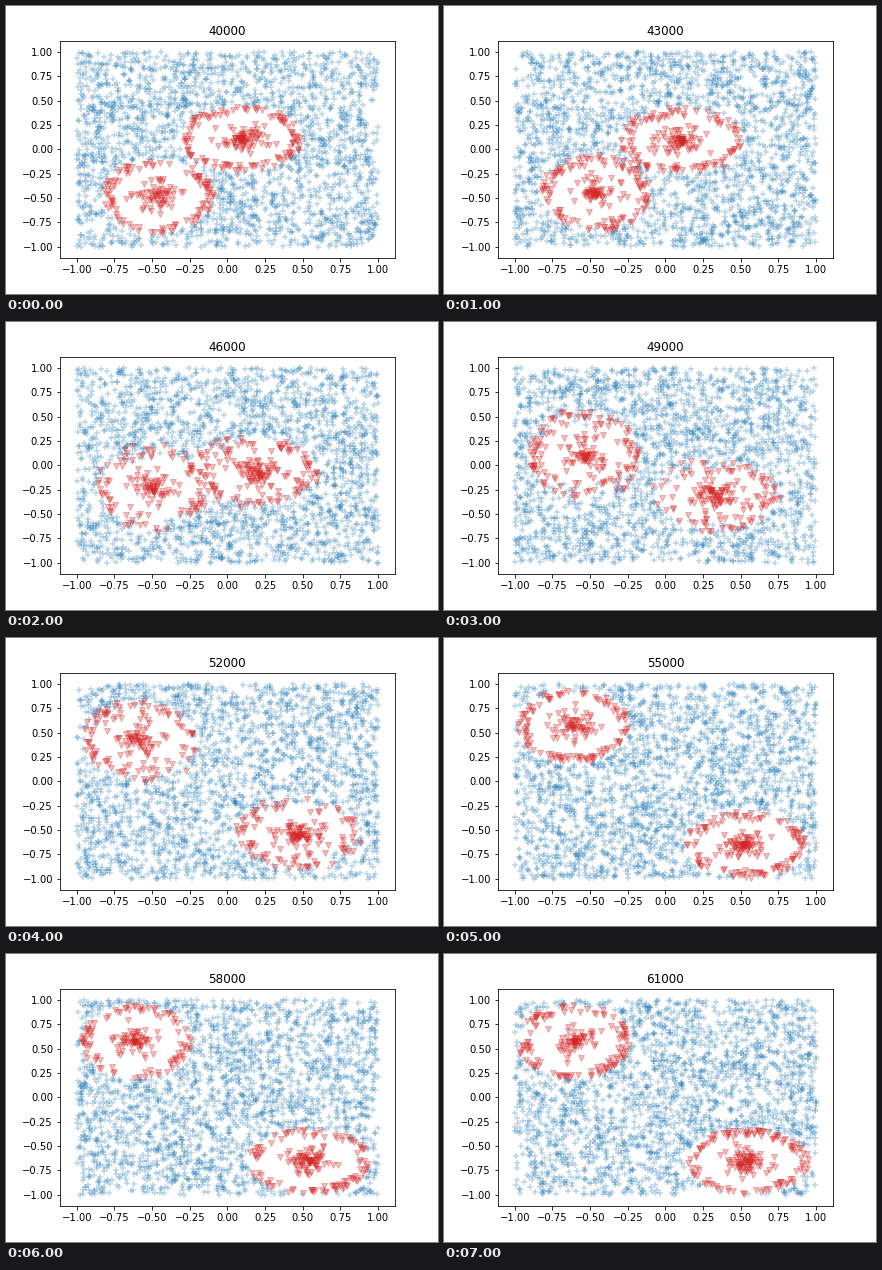
Animation, 432 px wide and 288 px high, one loop 8000 ms. Source, as a matplotlib script:

```python
import numpy as np
import matplotlib.pyplot as plt
from matplotlib.animation import FuncAnimation

FRAMES, INTERVAL = 8, 1000
N_POINTS, ALPHA = 2600, 0.3
SMEAR = 0.6          # part of a step over which one cloud was gathered
RING = 0.8           # inner edge of the red ring, relative to the blob radius

# start centre, end centre, radii, points in the core
BLOBS = [
    (np.array([-0.46, -0.48]), np.array([-0.61, 0.57]), np.array([0.37, 0.38]), 65),
    (np.array([0.09, 0.11]), np.array([0.54, -0.66]), np.array([0.41, 0.33]), 80),
]


def centre(blob, t):
    """Blob centre at step t, eased from start to end."""
    u = np.clip((np.asarray(t) - 0.5) / 4.7, 0, 1)
    ease = (1 - np.cos(np.pi * u)) / 2
    return blob[0] + ease[..., None] * (blob[1] - blob[0])


def times(rng, step, n):
    return step + SMEAR * rng.uniform(-0.5, 0.5, n)


def clouds(step):
    """Blue and red point sets of one step."""
    rng = np.random.default_rng(400 + step)
    pts = rng.uniform(-1, 1, (N_POINTS, 2))
    t = times(rng, step, N_POINTS)
    dist = np.min([np.hypot(*((pts - centre(b, t)) / b[2]).T) for b in BLOBS], axis=0)
    red = [pts[(dist > RING) & (dist < 1)]]
    for blob in BLOBS:
        n = blob[3]
        angle = rng.uniform(0, 2 * np.pi, n)
        r = np.minimum(np.abs(rng.normal(0, 0.3, n)), rng.uniform(0.4, 0.6, n))
        offset = np.column_stack([np.cos(angle), np.sin(angle)]) * r[:, None]
        red.append(centre(blob, times(rng, step, n)) + offset * blob[2])
    return pts[dist >= 1], np.vstack(red)


plt.rcParams["font.family"] = "DejaVu Sans"
fig = plt.figure(figsize=(6, 4), dpi=72)
ax = fig.add_axes([0.125, 0.125, 0.775, 0.755])
ax.set_xlim(-1.111, 1.111)
ax.set_ylim(-1.115, 1.115)
ticks = np.linspace(-1, 1, 9)
ax.set_xticks(ticks)
ax.set_yticks(ticks)
title = ax.set_title("40000", fontsize=12)
blue = ax.scatter([], [], marker="+", color="tab:blue", alpha=ALPHA)
red = ax.scatter([], [], marker="v", color="tab:red", alpha=ALPHA)


def draw(step):
    outside, inside = clouds(step)
    blue.set_offsets(outside)
    red.set_offsets(inside)
    title.set_text(str(40000 + 3000 * step))
    return blue, red, title


anim = FuncAnimation(fig, draw, frames=FRAMES, interval=INTERVAL,
                     init_func=lambda: draw(0), repeat=True, repeat_delay=0)
plt.show()
```
